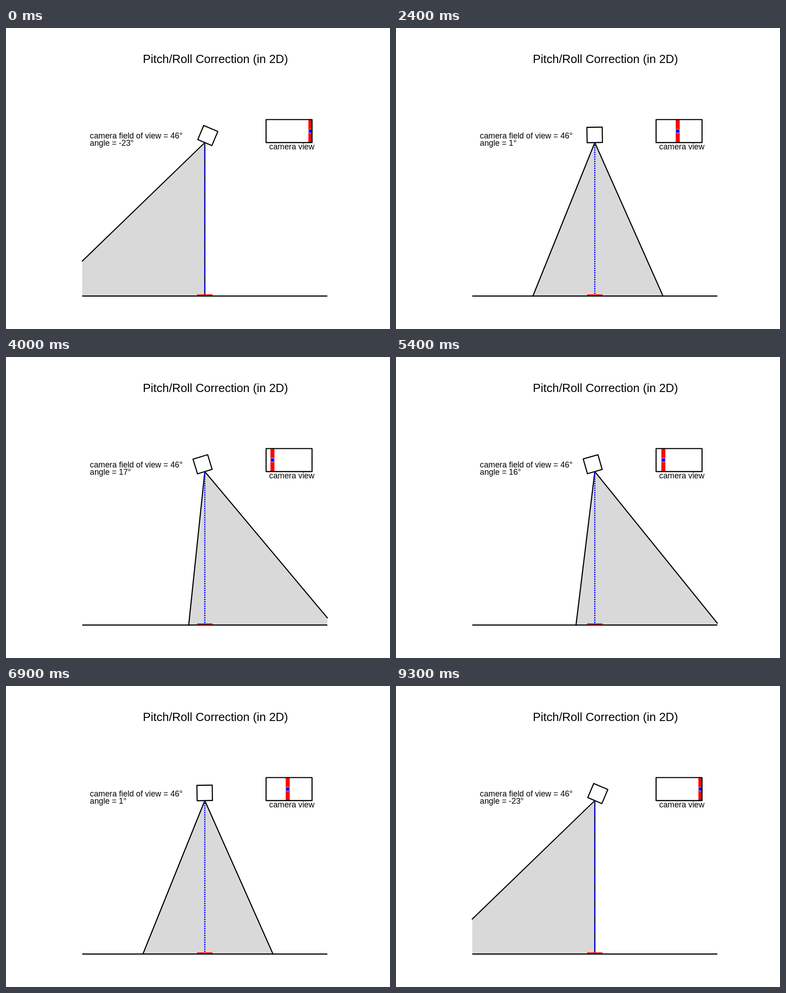
Animation of 846 by 662 pixels, one loop 9400 ms. Source, as an HTML page with a canvas:

```html
<!DOCTYPE html>
<html lang="en">
<head>
<meta charset="utf-8">
<title>Pitch/Roll Correction</title>
<style>
  html, body { margin: 0; width: 100%; height: 100%; overflow: hidden; background: #fff; }
  canvas { display: block; }
</style>
</head>
<body>
<canvas id="stage" width="846" height="662"></canvas>
<script>
const ctx = document.getElementById('stage').getContext('2d');

const UNIT = 33.75;
const PIVOT = { x: 438, y: 252 };
const HEIGHT = 10 * UNIT;
const GROUND = PIVOT.y + HEIGHT;
const REACH = 8 * UNIT;
const HALF_FOV = 23;
const VIEW = { x: PIVOT.x + 4 * UNIT, y: PIVOT.y - 1.5 * UNIT, w: 3 * UNIT, h: 1.5 * UNIT };
const STEP_MS = 100;
const STEPS = 94;

const rad = deg => deg * Math.PI / 180;

// One degree per step, resting one extra step at each end.
function angleAt(ms) {
  const step = Math.floor(ms / STEP_MS) % STEPS;
  return step < STEPS / 2 ? step - HALF_FOV : STEPS - 1 - HALF_FOV - step;
}

// Where a ray meets the ground or the side of the scene.
function rayEnd(deg) {
  const slope = Math.tan(rad(deg));
  const depth = Math.min(HEIGHT, REACH / Math.abs(slope));
  return { x: PIVOT.x + depth * slope, y: PIVOT.y + depth };
}

function line(x1, y1, x2, y2) {
  ctx.beginPath();
  ctx.moveTo(x1, y1);
  ctx.lineTo(x2, y2);
  ctx.stroke();
}

function label(text, x, y, size) {
  ctx.font = `${size}px "Liberation Sans", Arial, sans-serif`;
  ctx.fillStyle = '#000';
  ctx.fillText(text, x, y);
}

function pen(color, width) {
  ctx.strokeStyle = color;
  ctx.lineWidth = width;
}

function drawScene(angle) {
  const left = rayEnd(angle - HALF_FOV);
  const right = rayEnd(angle + HALF_FOV);

  ctx.fillStyle = '#d9d9d9';
  ctx.beginPath();
  ctx.moveTo(PIVOT.x, PIVOT.y);
  for (const [x, y] of [[left.x, left.y], [left.x, GROUND], [right.x, GROUND], [right.x, right.y]]) {
    ctx.lineTo(x, y);
  }
  ctx.fill();

  pen('#000', 2.4);
  line(PIVOT.x, PIVOT.y, left.x, left.y);
  line(PIVOT.x, PIVOT.y, right.x, right.y);

  ctx.fillStyle = '#f00';
  ctx.fillRect(PIVOT.x - UNIT / 2, GROUND - 3.6, UNIT, 3.6);
  ctx.lineCap = 'butt';
  line(PIVOT.x - REACH, GROUND, PIVOT.x + REACH, GROUND);

  ctx.save();
  ctx.translate(PIVOT.x, PIVOT.y);
  ctx.rotate(rad(-angle));
  ctx.fillStyle = '#fff';
  ctx.fillRect(-UNIT / 2, -UNIT, UNIT, UNIT);
  ctx.strokeRect(-UNIT / 2, -UNIT, UNIT, UNIT);
  ctx.restore();

  pen('#00f', 2.6);
  ctx.setLineDash([3, 2]);
  line(PIVOT.x, PIVOT.y, PIVOT.x, GROUND - 2);
  ctx.setLineDash([]);
}

function drawView(angle) {
  const x = 622.8 - 122.5 * Math.sin(rad(angle));
  ctx.save();
  ctx.beginPath();
  ctx.rect(VIEW.x, VIEW.y, VIEW.w, VIEW.h);
  ctx.clip();
  ctx.fillStyle = '#f00';
  ctx.fillRect(x - 4.4, VIEW.y, 8.8, VIEW.h);
  ctx.fillStyle = '#00f';
  ctx.beginPath();
  ctx.arc(x, VIEW.y + VIEW.h / 2, 4.6, 0, 2 * Math.PI);
  ctx.fill();
  pen('#fff', 0.9);
  ctx.stroke();
  ctx.restore();

  pen('#000', 2.4);
  ctx.strokeRect(VIEW.x, VIEW.y, VIEW.w, VIEW.h);
}

function draw(now) {
  const angle = angleAt(now);
  ctx.fillStyle = '#fff';
  ctx.fillRect(0, 0, 846, 662);
  ctx.lineJoin = ctx.lineCap = 'round';
  drawScene(angle);
  drawView(angle);
  label('Pitch/Roll Correction (in 2D)', 301.6, 77, 25.8);
  label(`camera field of view = ${2 * HALF_FOV}°`, 184.8, 243, 17.8);
  label(`angle = ${angle}°`, 184.8, 259, 17.8);
  label('camera view', 579.8, 267, 17.8);
}

const start = performance.now();
function tick() {
  draw(performance.now() - start);
  requestAnimationFrame(tick);
}
tick();
</script>
</body>
</html>
```
